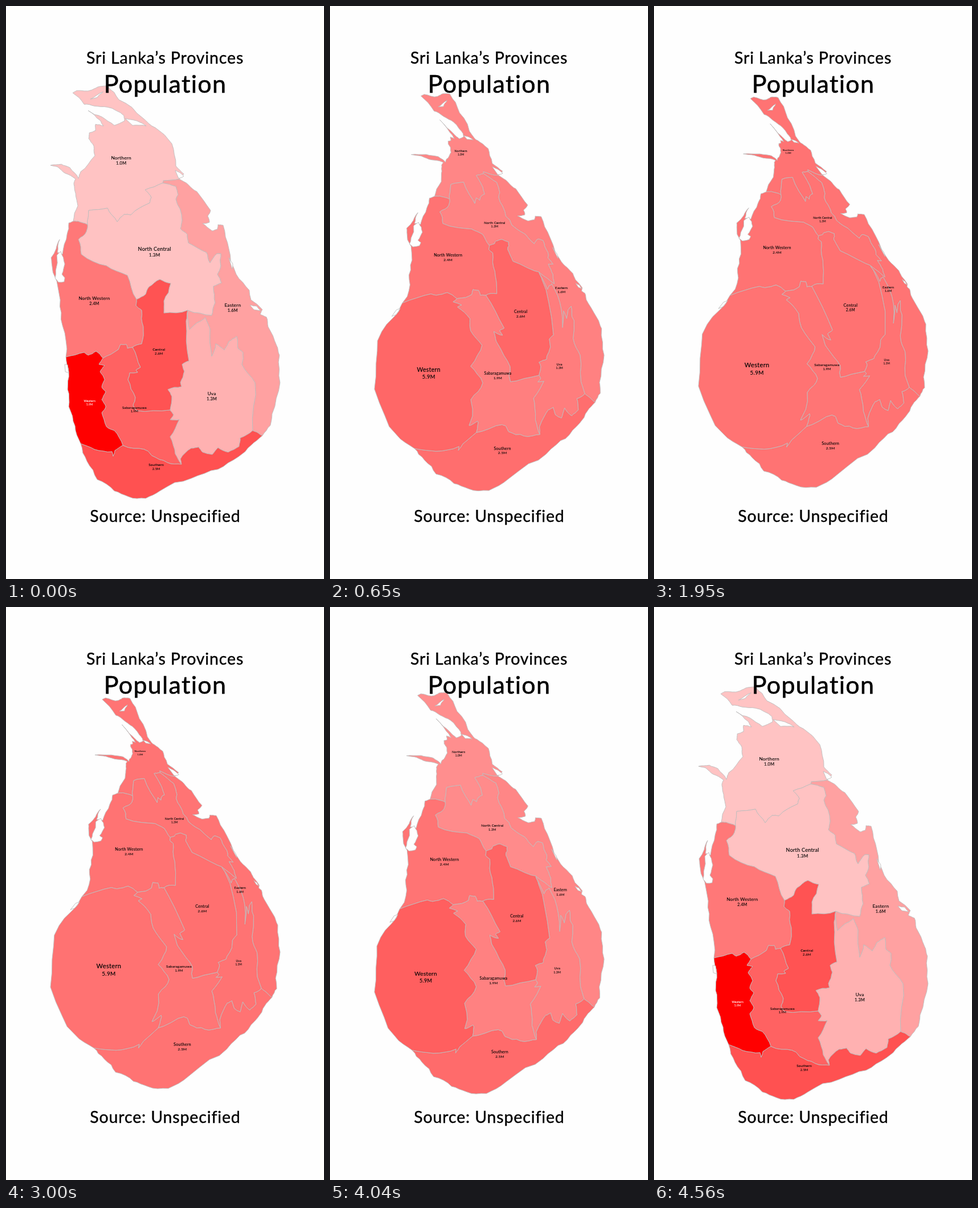
Animation of 558x1004 px, one loop 4.69 s. Source, as an HTML page with a canvas:

```html
<!DOCTYPE html>
<html lang="en">
<head>
<meta charset="utf-8">
<title>Provinces by population</title>
<style>
  html, body { margin: 0; width: 100%; height: 100%; overflow: hidden; background: #fefefe; }
  canvas { display: block; width: 100vw; height: 100vh; }
</style>
</head>
<body>
<canvas id="map" width="558" height="1004"></canvas>
<script>
const ctx = document.getElementById('map').getContext('2d');
const PAPER = '#fefefe', LINE = '#bdbdbd';
const CX = 279.5, CY = 501.5, MAX_W = 403, MAX_H = 723;
const STEP = 130, LAST = 17, LOOP = 4690;

let seed = 11;
const rand = () => (seed = (seed * 16807) % 2147483647) / 2147483647;
const sum = list => list.reduce((a, b) => a + b, 0);
const clamp = (v, lo, hi) => Math.max(lo, Math.min(hi, v));

// Midpoint displacement gives coasts and borders their small wiggles.
function roughen(pts, depth) {
  if (!depth) return pts;
  const out = [pts[0]];
  for (let i = 1; i < pts.length; i++) {
    const [x, y] = pts[i - 1], [u, v] = pts[i], k = (rand() - 0.5) * 0.14;
    out.push([(x + u) / 2 - (v - y) * k, (y + v) / 2 + (u - x) * k], [u, v]);
  }
  return roughen(out, depth - 1);
}

function arc(...nums) {
  const pts = [];
  for (let i = 0; i < nums.length; i += 2) pts.push([nums[i], nums[i + 1]]);
  return roughen(pts, 2);
}

// Key points of the plain map; neighbours share their borders.
const plain = {
  // coasts, clockwise
  north1: arc(118,377, 126,350, 122,328, 119,312, 122,303, 104,293, 91,282, 78,279, 97,277, 112,283, 127,302,
    131,290, 156,262, 154,245, 145,232, 146,222, 157,218, 157,207, 171,210, 165,200, 144,183),
  north2: arc(144,183, 168,194, 190,209, 208,201, 207,192, 178,177, 155,175, 137,172, 117,152, 124,148,
    150,147, 160,142, 178,140, 198,164, 240,196, 262,213, 291,241, 298,280, 312,294, 304,303),
  east: arc(304,303, 320,313, 335,325, 359,358, 354,368, 357,379, 345,381, 362,394, 371,391, 372,383,
    381,384, 391,425, 404,470, 427,498, 430,515, 450,532, 446,540, 457,545, 460,562, 475,595, 480,612,
    481,660, 467,715, 464,735, 450,753),
  south: arc(450,753, 430,770, 408,790, 372,812, 325,828, 270,850, 245,863, 215,860, 190,850, 160,830,
    142,798, 131,767),
  west: arc(131,767, 121,736, 110,702, 108,672, 110,642, 105,615),
  northwest: arc(105,615, 99,560, 95,515, 80,450, 79,441, 88,425, 94,409, 90,432, 99,435, 107,400, 110,380,
    118,377),
  // inner borders
  nNw: arc(118,377, 126,377, 143,383),
  nNc: arc(143,383, 145,358, 178,354, 195,378, 207,365, 219,366, 252,345, 255,335, 244,322, 275,310),
  nE: arc(275,310, 276,306, 304,303),
  ncE: arc(275,310, 298,316, 302,330, 298,338, 309,375, 306,390, 318,400, 320,415, 352,432, 358,450,
    370,434, 377,434, 377,455, 371,470, 378,485, 364,491, 367,520, 361,542, 319,533),
  ncNw: arc(143,383, 141,395, 127,409, 132,435, 176,455, 213,472, 229,514),
  cNc: arc(229,514, 245,505, 251,492, 270,479, 289,486, 277,517, 277,538, 319,533),
  nwC: arc(229,514, 228,525, 238,533, 241,562, 238,592, 222,598),
  nwSa: arc(222,598, 213,600, 211,593, 201,593, 197,602, 170,617),
  wNw: arc(105,615, 137,607, 144,612, 158,605, 170,617),
  wSa: arc(170,617, 163,628, 173,630, 165,641, 173,655, 168,668, 175,676, 168,690, 175,702, 168,713,
    176,737, 190,744, 205,770),
  wSo: arc(131,767, 155,777, 186,781, 188,789, 191,779, 205,770),
  saC: arc(222,598, 236,633, 228,638, 231,642, 217,643, 214,655, 227,686, 223,700, 229,709, 288,708),
  cU: arc(319,533, 316,552, 321,622, 309,628, 313,640, 306,660, 308,667, 284,672, 291,684, 288,708),
  saU: arc(288,708, 294,716, 288,725, 304,725, 288,755, 297,785, 308,803),
  saSo: arc(205,770, 243,777, 250,781, 256,788, 283,800, 308,803),
  uSo: arc(308,803, 306,794, 325,775, 338,773, 345,782, 362,786, 372,774, 390,782, 409,772, 411,757, 433,744),
  eSo: arc(433,744, 442,748, 450,753),
  uE: arc(319,533, 322,567, 350,546, 358,566, 361,614, 368,592, 383,603, 391,588, 405,579, 407,600, 416,607,
    414,628, 437,660, 433,744),
  // enclosed water
  waterWest: arc(89,437, 96,430, 103,452, 98,470, 103,476, 102,483, 92,484, 86,477, 90,450),
  waterNorth: arc(209,197, 236,204, 246,210, 222,209),
  waterTip: arc(148,163, 170,150, 160,160),
  waterBay: arc(297,288, 304,291, 312,298, 303,302),
  waterEast: arc(428,524, 440,526, 447,534, 435,532),
  waterCape: arc(391,441, 398,452, 397,461),
  waterSpit: arc(103,628, 108,629, 110,643, 104,641)
};

const provinces = [
  ['Northern', 1.0, 'north1 north2 -nE -nNc -nNw'],
  ['Eastern', 1.6, 'east -eSo -uE -ncE nE'],
  ['North Central', 1.3, 'nNc ncE -cNc -ncNw'],
  ['North Western', 2.4, 'northwest nNw ncNw nwC nwSa -wNw'],
  ['Uva', 1.3, 'uE -uSo -saU -cU'],
  ['Southern', 2.5, 'south wSo saSo uSo eSo'],
  ['Sabaragamuwa', 1.9, '-nwSa saC saU -saSo -wSa'],
  ['Central', 2.6, 'cNc cU -saC -nwC'],
  ['Western', 5.9, 'west wNw wSa -wSo']
].map(([name, people, border]) => ({ name, people, border: border.split(' ') }));
const everyone = sum(provinces.map(p => p.people));

// A leading minus walks the arc backwards.
const ringOf = (sheet, border) =>
  border.flatMap(n => n[0] === '-' ? [...sheet[n.slice(1)]].reverse() : sheet[n]);

function measure(ring) {
  let area = 0, mx = 0, my = 0;
  ring.forEach(([x, y], i) => {
    const [u, v] = ring[(i + 1) % ring.length], cross = x * v - u * y;
    area += cross / 2;
    mx += (x + u) * cross / 6;
    my += (y + v) * cross / 6;
  });
  return { ring, area: Math.abs(area), center: [mx / area, my / area] };
}

// Every province with its present area and the area its people deserve.
function survey(sheet) {
  const shapes = provinces.map(p => ({ ...p, ...measure(ringOf(sheet, p.border)) }));
  const land = sum(shapes.map(s => s.area));
  for (const s of shapes) s.due = land * s.people / everyone;
  return shapes;
}

const mapSheet = (sheet, move) =>
  Object.fromEntries(Object.entries(sheet).map(([name, pts]) => [name, pts.map(move)]));

// One rubber-sheet step: each province pushes or pulls all points from its centre.
function warp(sheet) {
  const shapes = survey(sheet);
  const error = sum(shapes.map(s => Math.max(s.area / s.due, s.due / s.area))) / shapes.length;
  const forces = shapes.map(s => {
    const radius = Math.sqrt(s.area / Math.PI);
    return { center: s.center, radius, mass: Math.sqrt(s.due / Math.PI) - radius };
  });
  return mapSheet(sheet, ([x, y]) => {
    let px = 0, py = 0;
    for (const { center, radius, mass } of forces) {
      const dx = x - center[0], dy = y - center[1], d = Math.hypot(dx, dy), r = d / radius;
      const pull = mass * (r > 1 ? 1 / r : r * r * (4 - 3 * r)) / d;
      px += dx * pull;
      py += dy * pull;
    }
    return [x + px / (1 + error), y + py / (1 + error)];
  });
}

// Scales a sheet to fill the same box at every step.
function fit(sheet) {
  const pts = Object.entries(sheet).filter(([n]) => !n.startsWith('water')).flatMap(([, p]) => p);
  const xs = pts.map(p => p[0]), ys = pts.map(p => p[1]);
  const x0 = Math.min(...xs), x1 = Math.max(...xs), y0 = Math.min(...ys), y1 = Math.max(...ys);
  const k = Math.min(MAX_W / (x1 - x0), MAX_H / (y1 - y0));
  return mapSheet(sheet, ([x, y]) => [CX + (x - (x0 + x1) / 2) * k, CY + (y - (y0 + y1) / 2) * k]);
}

function prepare(sheet) {
  const placed = fit(sheet);
  const water = Object.keys(placed).filter(n => n.startsWith('water')).map(n => placed[n]);
  return { shapes: survey(placed), water };
}

const scenes = [];
for (let i = 0, sheet = plain; i <= LAST; i++, sheet = warp(sheet)) scenes.push(prepare(sheet));

function fillShape(pts, fill) {
  ctx.beginPath();
  for (const p of pts) ctx.lineTo(...p);
  ctx.closePath();
  ctx.fillStyle = fill;
  ctx.fill();
  ctx.stroke();
}

function text(str, x, y, size, color = '#000', baseline = 'alphabetic') {
  ctx.font = `${size}px Lato, sans-serif`;
  ctx.letterSpacing = size * 0.03 + 'px';
  ctx.textBaseline = baseline;
  ctx.fillStyle = ctx.strokeStyle = color;
  ctx.lineWidth = size * 0.014;
  ctx.fillText(str, x, y);
  ctx.strokeText(str, x, y);
}

// Crowded provinces are a stronger red.
const tone = s => Math.round(clamp(115 - 57 * Math.log2(s.due / s.area), 0, 195));

function draw({ shapes, water }) {
  ctx.fillStyle = PAPER;
  ctx.fillRect(0, 0, 558, 1004);
  ctx.lineJoin = 'round';
  ctx.textAlign = 'center';
  ctx.strokeStyle = LINE;
  ctx.lineWidth = 0.9;
  for (const s of shapes) fillShape(s.ring, `rgb(255,${tone(s)},${tone(s)})`);
  for (const pts of water) fillShape(pts, PAPER);

  for (const s of shapes) {
    const [x, y] = s.center, size = Math.sqrt(s.area) / 19.3;
    const color = tone(s) < 50 ? '#fff' : '#000';
    text(s.name, x, y - size * 0.6, size, color, 'middle');
    text(s.people.toFixed(1) + 'M', x, y + size * 0.55, size * 0.9, color, 'middle');
  }
  text('Sri Lanka’s Provinces', 279, 101, 28.5);
  text('Population', 279.5, 152, 43);
  text('Source: Unspecified', 279.5, 904, 28.5);
}

// Steps out to the cartogram, holds, and steps back.
function stepAt(t) {
  const n = Math.floor((t < 2340 ? t : t - 10) / STEP);
  return n <= LAST ? n : Math.max(0, 2 * LAST + 1 - n);
}

const start = performance.now();
function tick() {
  draw(scenes[stepAt((performance.now() - start) % LOOP)]);
  requestAnimationFrame(tick);
}
tick();
</script>
</body>
</html>
```
